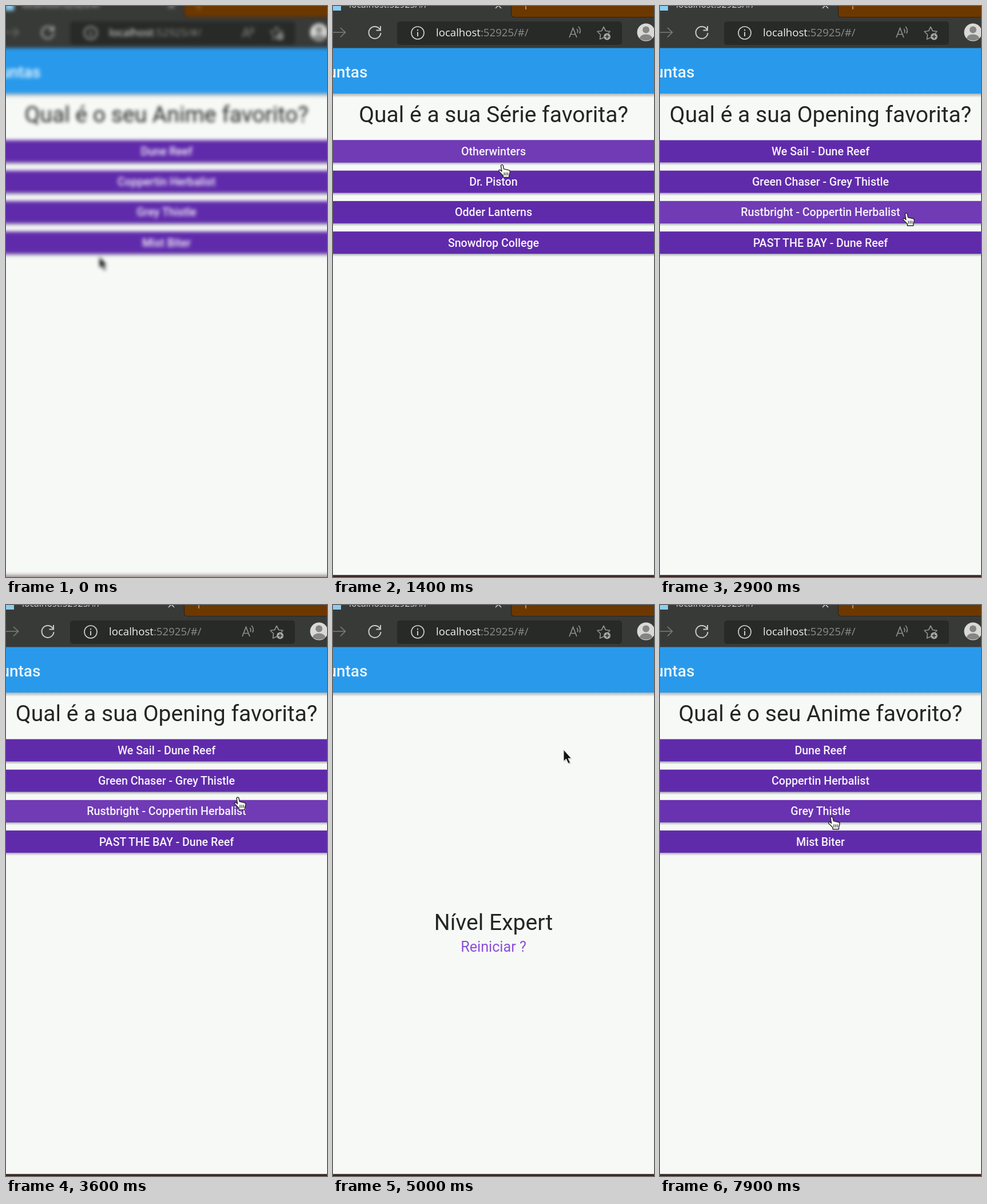
An HTML page for the animation above (8000 ms loop, 561x998 px).

```html
<!DOCTYPE html>
<html lang="pt">
<head>
<meta charset="utf-8">
<title>Perguntas</title>
<style>
html, body { margin: 0; width: 100%; height: 100%; overflow: hidden; background: #f7f9f6; }
svg { display: block; width: 561px; height: 998px; overflow: hidden; }
text { font-family: Roboto, sans-serif; white-space: pre; }
.url { font-family: "Open Sans", "Noto Sans", sans-serif; }
.mid { text-anchor: middle; }
.head { font-size: 39.1px; fill: #242524; }
.label { font-size: 19.6px; font-weight: 500; fill: #f6f2fb; }
.line { fill: none; stroke: #c9cac8; stroke-width: 1.7; }
</style>
</head>
<body>
<svg viewBox="0 0 561 998">
  <defs>
    <linearGradient id="shade" x2="0" y2="1">
      <stop offset="0" stop-color="#5b6672" stop-opacity=".5"/>
      <stop offset="1" stop-color="#5b6672" stop-opacity="0"/>
    </linearGradient>
    <clipPath id="pill"><rect x="212" y="577" width="136.500" height="39.500" rx="5"/></clipPath>
  </defs>
  <g id="stage">
    <rect x="-30" y="-30" width="621" height="1060" fill="#f7f9f6"/>

    <g id="quiz">
      <text id="question" class="mid head" x="280.500" y="203"></text>
      <g id="buttons"></g>
    </g>

    <g id="result">
      <text class="mid head" x="280.500" y="568">Nível Expert</text>
      <g clip-path="url(#pill)">
        <rect id="glow" x="212" y="577" width="137" height="40" fill="#e4eef6"/>
        <circle id="ripple" cx="297" cy="598" fill="#c5e3f4"/>
      </g>
      <text class="mid" x="280.500" y="606" font-size="25.2" fill="#8a50dc">Reiniciar ?</text>
    </g>

    <rect x="-30" y="153" width="621" height="7" fill="url(#shade)"/>
    <rect x="-30" y="73" width="621" height="80" fill="#299aeb"/>
    <text x="60.500" y="125" text-anchor="end" font-size="28" font-weight="500" fill="#e9f5fd">Perguntas</text>

    <rect x="-30" y="-30" width="621" height="103.500" fill="#383a38"/>
    <path d="M312 -30V14Q312 19 317 19H591V-30Z" fill="#6d3800"/>
    <path d="M311.500 -30V14Q311.500 19.500 317 19.500H591" fill="none" stroke="#2b241d" stroke-width="1.200"/>
    <path d="M337 -6V6" stroke="#c49a72" stroke-width="1.700"/>
    <rect x="-2" y="-10" width="16" height="18" fill="#8ccdf2"/>
    <text class="url" x="28" y="3" font-size="15.8" fill="#d5d6d4">localhost:52925/#/</text>
    <path class="line" d="M284 -6L294 4M294 -6L284 4"/>

    <rect x="112" y="27" width="393" height="41" rx="5" fill="#282a27"/>
    <path class="line" style="stroke:#7b7d7a" d="M-30 46H21M13 38L21.500 46L13 54.500"/>
    <path class="line" style="stroke-width:2" d="M82 41A10.500 10.500 0 1 0 83.500 47M83 35V42.500H75.500"/>
    <circle class="line" cx="148" cy="47" r="11"/>
    <path class="line" style="stroke-width:2" d="M148 45.500V53M148 41V43.200"/>
    <text class="url" x="180" y="53" font-size="18.600" fill="#f0f1ef">localhost<tspan fill="#8b8d8a">:52925/#/</tspan></text>
    <g class="line" style="stroke:#8f918e">
      <path d="M413 55L419.500 38.500L426 55M415.500 49.500H423.500M426 40Q429 43 427 47M429 36Q434 41 431 48"/>
      <path d="M475 54.500L466.500 58L467.500 50L462 44.500L469.500 43.500L473 36.500L476.500 43.500L484 44.500L481 47.500" stroke-linejoin="round"/>
    </g>
    <circle cx="479" cy="53.500" r="6" fill="#a6a8a5"/>
    <path d="M479 50V57M475.500 53.500H482.500" stroke="#282a27" stroke-width="1.500"/>
    <circle cx="547" cy="46" r="15.500" fill="#d9d9d8"/>
    <circle cx="547" cy="41.500" r="6" fill="#858583"/>
    <path d="M536 57Q537 49.500 547 49.500T558 57Q547 64 536 57" fill="#858583"/>

    <rect id="edge" x="-30" y="994.500" width="621" height="36" fill="#3d2722"/>

    <g id="arrow">
      <path d="M0 0V20L4.500 16L8 24L11.500 22.500L8 15H13.500Z" transform="translate(1.500 1.500)" fill="#000" opacity=".18"/>
      <path d="M0 0V20L4.500 16L8 24L11.500 22.500L8 15H13.500Z" fill="#141414" stroke="#e9e9e8" stroke-width="1"/>
    </g>
    <g id="hand">
      <path d="M-2 1.500Q0 -1.500 2 1.500L3.200 7.500L12 9.500Q14.500 10.500 14 13L12.500 18V22H2V19L-5 12Q-6.500 9 -3.500 9L-.5 11.500Z" fill="#f5f5f4" stroke="#262626" stroke-width="1.400" stroke-linejoin="round"/>
      <path d="M4 13.500V18.500M7 13.500V18.500M10 13.500V18.500" stroke="#333" stroke-width="1.200"/>
    </g>
  </g>
</svg>
<script>
const LOOP = 8000, STEP = 100, RESULT = 3;
const $ = id => document.getElementById(id);

const quizzes = [
  ["Qual é o seu Anime favorito?", "Dune Reef", "Coppertin Herbalist", "Grey Thistle", "Mist Biter"],
  ["Qual é a sua Série favorita?", "Otherwinters", "Dr. Piston", "Odder Lanterns", "Snowdrop College"],
  ["Qual é a sua Opening favorita?", "We Sail - Dune Reef", "Green Chaser - Grey Thistle",
    "Rustbright - Coppertin Herbalist", "PAST THE BAY - Dune Reef"]
];

// [start, screen]
const screens = [[0, 0], [1300, 1], [2900, 2], [4600, RESULT], [6600, 0]];

// [time, x, y] of the pointer tip
const path = [
  [0, 163, 438], [400, 286, 262], [1300, 287, 262], [1900, 400, 470], [2200, 425, 478],
  [2300, 430, 446], [2400, 432, 371], [2600, 432, 362], [3000, 430, 362], [3500, 410, 352],
  [3600, 405, 336], [4000, 404, 255], [5000, 403, 253], [5100, 403, 253], [5900, 300, 598],
  [6200, 297, 600], [6900, 297, 600], [7700, 302, 392], [7800, 301, 378], [7900, 300, 370]
];

const top0 = 234.5, pitch = 53.2, height = 39;
const buttons = [0, 1, 2, 3].map(i => {
  const y = top0 + i * pitch;
  const add = (tag, attrs) => {
    const el = document.createElementNS("http://www.w3.org/2000/svg", tag);
    for (const k in attrs) el.setAttribute(k, attrs[k]);
    return $("buttons").appendChild(el);
  };
  const bar = { x: -30, y, width: 621, height };
  add("rect", { ...bar, y: y + height, height: 5, fill: "url(#shade)" });
  add("rect", { ...bar, fill: "#602bab" });
  const light = add("rect", { ...bar, fill: "#703bb5" });
  const label = add("text", { class: "mid label", x: 280.5, y: y + 26.5 });
  return { light, label };
});

const screenAt = t => screens.filter(s => s[0] <= t).pop()[1];

function pointAt(t) {
  const i = path.findIndex(p => p[0] > t);
  if (i < 0) return path[path.length - 1].slice(1);
  const [t0, x0, y0] = path[Math.max(i - 1, 0)], [t1, x1, y1] = path[i];
  const u = Math.max(0, (t - t0) / (t1 - t0)), e = u * u * (3 - 2 * u);
  return [x0 + (x1 - x0) * e, y0 + (y1 - y0) * e];
}

// Index of the control under the pointer, or -1
function overAt(t, screen) {
  const [x, y] = pointAt(Math.max(t, 0));
  if (screen === RESULT) return x > 212 && x < 348 && y > 577 && y < 616 ? 0 : -1;
  return [0, 1, 2, 3].findIndex(i => y >= top0 + i * pitch && y <= top0 + i * pitch + height);
}

function draw(t) {
  const screen = screenAt(t), done = screen === RESULT;
  const hover = i => [1, 2].filter(n => overAt(t - n * STEP, screen) === i).length / 2;

  $("quiz").style.display = done ? "none" : "";
  $("result").style.display = done ? "" : "none";
  if (done) {
    $("glow").style.opacity = hover(0);
    $("ripple").setAttribute("r", Math.max(0, (t - 6250) * 0.15));
  } else {
    const [question, ...answers] = quizzes[screen];
    $("question").textContent = question;
    buttons.forEach((b, i) => {
      b.label.textContent = answers[i];
      b.light.style.opacity = hover(i);
    });
  }

  const [x, y] = pointAt(t);
  const hand = overAt(t, screen) >= 0 || overAt(t - STEP, screen) >= 0;
  for (const id of ["arrow", "hand"]) {
    $(id).setAttribute("transform", `translate(${x} ${y})`);
    $(id).style.display = (id === "hand") === hand ? "" : "none";
  }

  // The picture opens blurred, then settles to a slight softness
  const blur = 0.45 + 2.5 * Math.max(0, 1 - t / 300);
  $("stage").style.filter = `blur(${blur}px)`;
  $("edge").style.opacity = t < STEP ? 0.5 : 1;
}

let start, last = -1;
function tick() {
  const now = performance.now();
  start ??= now;
  const t = Math.floor(((now - start) % LOOP) / STEP) * STEP;
  if (t !== last) draw(last = t);
  requestAnimationFrame(tick);
}
tick();
</script>
</body>
</html>
```
